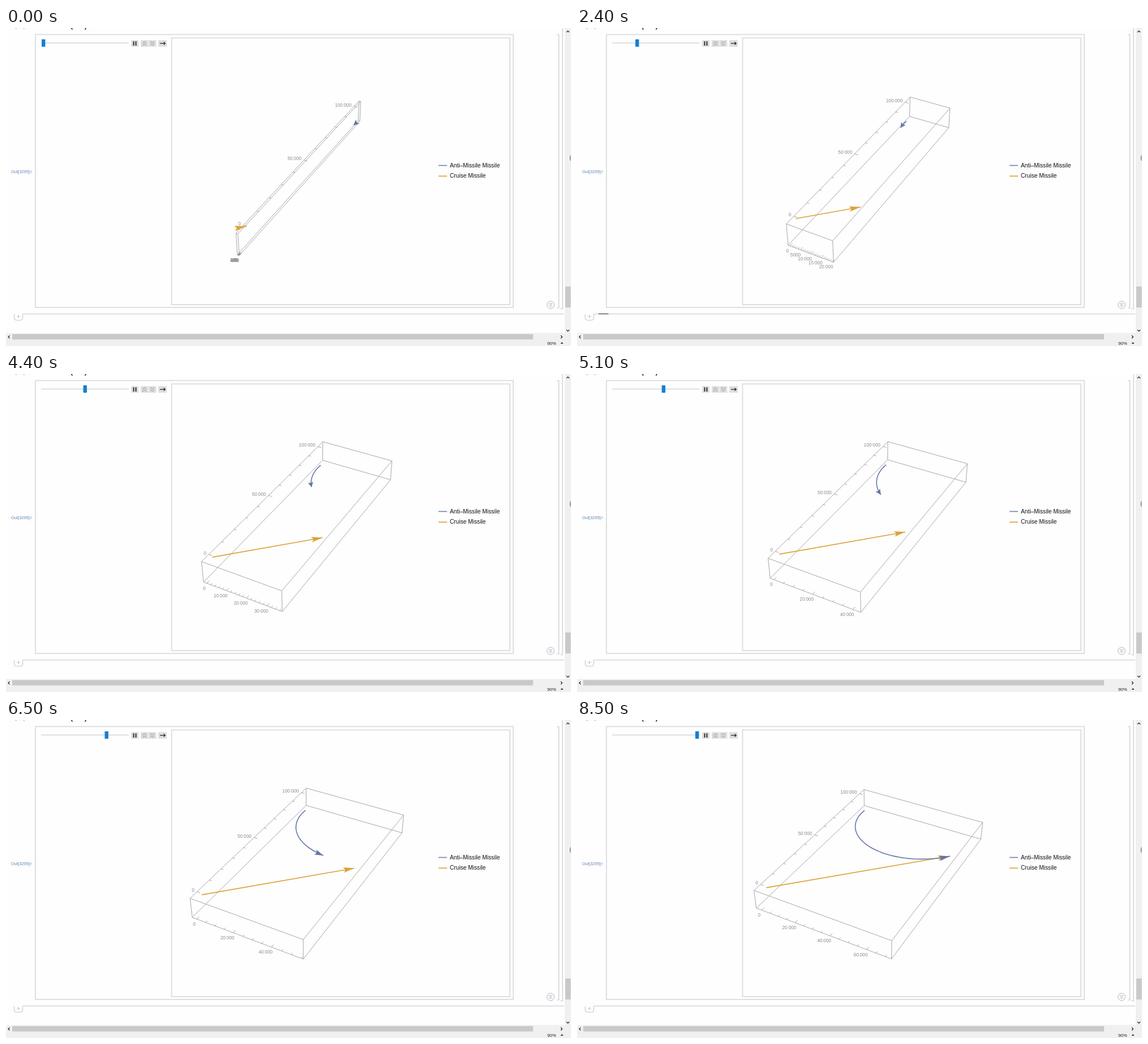
These frames come from a looping animation (998x561 px, 8600 ms). An HTML page with a canvas:

```html
<!DOCTYPE html>
<html lang="en">
<head>
<meta charset="utf-8">
<title>Missile intercept</title>
<style>
  html, body { margin: 0; width: 100%; height: 100%; overflow: hidden; background: #fefefe; }
  svg, canvas { position: absolute; left: 0; top: 0; width: 998px; height: 561px; }
  text { font-family: "Liberation Sans", Arial, sans-serif; }
  .frame { fill: none; stroke: #dcdcdc; stroke-width: 1.8; }
  .line { fill: none; stroke: #c8c8c8; stroke-width: 1.2; }
  .icon { fill: none; stroke: #8a8a8a; stroke-width: 1; }
  .dark { fill: none; stroke: #222; stroke-width: 1.2; }
  .button { fill: #dedede; }
  .bar { fill: #f0f0f0; }
  .thumb { fill: #c9c9c9; }
</style>
</head>
<body>
<svg viewBox="0 0 998 561">
  <text x="15" y="-1" font-size="12" fill="#999">( , ( ,</text>
  <text x="114" y="0" font-size="12" font-weight="bold" fill="#222">(sim)</text>

  <rect class="frame" x="52" y="11.5" width="844" height="481.5"/>
  <rect class="frame" x="292.5" y="17.5" width="597.5" height="470.5"/>

  <path class="line" d="M62 26.5H217"/>
  <rect id="slider" x="-3" y="20" width="6.4" height="13" fill="#167fd0"/>
  <rect class="button" x="221" y="21.5" width="13" height="11.5"/>
  <rect class="button" x="238" y="21.5" width="13.3" height="11.5"/>
  <rect class="button" x="252" y="21.5" width="13.3" height="11.5"/>
  <rect class="button" x="269" y="21.5" width="15" height="11.5"/>
  <path d="M225.5 23.5v7.5M229.5 23.5v7.5" stroke="#222" stroke-width="1.8"/>
  <path class="icon" d="M241 27l3.5-3 3.5 3M241 31l3.5-3 3.5 3M255 23.5l3.5 3 3.5-3M255 27.5l3.5 3 3.5-3"/>
  <path class="dark" d="M272 27.2h9M278.5 24.8l2.7 2.4-2.7 2.4"/>

  <text x="9" y="255.5" font-size="7.5" fill="#5f83b3">Out[3295]=</text>

  <path d="M764 242.5h15" stroke="#7189a9" stroke-width="1.7"/>
  <path d="M764 261.3h15" stroke="#dfa437" stroke-width="1.7"/>
  <text x="784" y="246" font-size="10.2" fill="#111">Anti–Missile Missile</text>
  <text x="784" y="264" font-size="10.2" fill="#111">Cruise Missile</text>

  <path class="line" d="M973 11.5h3.5V494h-3.5M983 0V495.5h-3.5"/>
  <circle cx="962" cy="488.5" r="6.5" fill="#f8f9fb" stroke="#b0b8c4"/>
  <path d="M959.5 485.5l2.5 2.2 2.5-2.2M959.5 489l2.5 2.2 2.5-2.2" fill="none" stroke="#98a3b5"/>

  <path class="line" d="M30 504.5H986"/>
  <path class="line" d="M14.5 505v6q0 4.5 4.5 4.5h6q4.5 0 4.5-4.5v-6.5M19 509h6M22 506v6"/>
  <path id="caret" d="M38 504.3h17.5" stroke="#777" stroke-width="1.8"/>

  <rect class="bar" x="987" width="11" height="561"/>
  <rect class="bar" y="538" width="998" height="23"/>
  <rect class="thumb" x="988" y="456" width="9.5" height="37"/>
  <rect class="thumb" x="11" y="540" width="920" height="9.5"/>
  <path class="dark" d="M990 7.5l2.5-2.5 2.5 2.5M990 532.5l2.5 2.5 2.5-2.5M6.5 542.5l-2.5 2.5 2.5 2.5M980 542.5l2.5 2.5-2.5 2.5"/>
  <text x="956" y="559" font-size="7.8" fill="#222">90%</text>
  <path d="M979.5 557l2.5-3 2.5 3z" fill="#333"/>
  <path d="M998 224.5l-1.5 2v6l1.5 1.5" fill="#fff" stroke="#444"/>
</svg>
<canvas id="plot"></canvas>

<script>
const LOOP = 8600, STEP = 100;
const LENGTH = 111000;          // data units along the longest box side, which has size 1
const HALF_HEIGHT = 0.051;
const FINAL_WIDTH = 0.688;
const BLUE = '#6474a9', ORANGE = '#dca23a', EDGE = '#a5a5a5';

// time and slider position; playback speed varies slightly
const PACE = [[0, 66], [1300, 87.5], [3400, 123], [4400, 139.5], [5700, 164], [7400, 192.5], [8500, 212]];

const canvas = document.getElementById('plot');
const slider = document.getElementById('slider');
const caret = document.getElementById('caret');
const ratio = window.devicePixelRatio || 1;
canvas.width = 998 * ratio;
canvas.height = 561 * ratio;
const ctx = canvas.getContext('2d');
ctx.scale(ratio, ratio);

let width, scale;

function sliderAt(t) {
  const i = Math.max(1, PACE.findIndex(([time]) => time >= t));
  const [t0, x0] = PACE[i - 1], [t1, x1] = PACE[i];
  return x0 + (x1 - x0) * (t - t0) / (t1 - t0);
}

// perspective view from (1.3, -2.4, 2) towards the box centre
function project([x, y, z]) {
  const depth = 3.384 - 0.384 * x + 0.709 * y - 0.591 * z;
  return [
    528 + scale * (0.879 * x + 0.476 * y) / depth,
    252 - scale * (-0.281 * x + 0.52 * y + 0.806 * z) / depth
  ];
}

const place = (x, y, h) => [x - 0.4566 * width, y - 0.4505, 0.093 * (h - 0.5)];

// circular turn; u is the flown share of the arc
function interceptor(u) {
  const turn = 2.27 * u, radius = 0.382;
  return place(radius * (1 - Math.cos(turn)), 0.901 - radius * Math.sin(turn), u);
}

function stroke(points, color, weight) {
  ctx.beginPath();
  points.forEach(p => ctx.lineTo(...p));
  ctx.strokeStyle = color;
  ctx.lineWidth = weight;
  ctx.stroke();
}

function drawBox() {
  const corner = n => [(n & 1 ? 0.5 : -0.5) * width, n & 2 ? 0.5 : -0.5, n & 4 ? HALF_HEIGHT : -HALF_HEIGHT];
  for (let n = 0; n < 8; n++)
    for (const bit of [1, 2, 4])
      if (!(n & bit)) stroke([project(corner(n)), project(corner(n | bit))], EDGE, 1);
}

function drawTick(base, inner, major) {
  const p = project(base), q = project(inner);
  const k = (major ? 6 : 4) / Math.hypot(q[0] - p[0], q[1] - p[1]);
  stroke([p, [p[0] + (q[0] - p[0]) * k, p[1] + (q[1] - p[1]) * k]], '#999', 0.9);
  return p;
}

function drawLabel(value, x, y, align) {
  const digits = String(value);
  const text = digits.length > 4 ? digits.slice(0, -3) + '\u2009' + digits.slice(-3) : digits;
  ctx.textAlign = align;
  ctx.fillText(text, align === 'center' ? x - 3 - 0.3 * ctx.measureText(text).width : x, y);
}

function niceStep(range) {
  for (let power = 10; ; power *= 10)
    for (const lead of [1, 2, 5])
      if (range / (lead * power) <= 4.5) return [lead * power, lead === 2 ? 4 : 5];
}

function drawAxes() {
  ctx.font = '8.3px "Liberation Sans", Arial, sans-serif';
  ctx.textBaseline = 'middle';
  ctx.fillStyle = '#8c8c8c';

  for (let v = 0; v <= 100000; v += 10000) {
    const y = v / LENGTH - 0.4505, major = v % 50000 === 0;
    const p = drawTick([-width / 2, y, HALF_HEIGHT], [0.05 - width / 2, y, HALF_HEIGHT], major);
    if (major) drawLabel(v, p[0] - 4.5, p[1] - 2, 'right');
  }

  const range = width * LENGTH, [step, parts] = niceStep(range);
  for (let i = 0; i * step / parts <= 0.9566 * range; i++) {
    const v = i * step / parts, x = v / LENGTH - 0.4566 * width, major = i % parts === 0;
    const p = drawTick([x, -0.5, -HALF_HEIGHT], [x, -0.45, -HALF_HEIGHT], major);
    if (major) drawLabel(v, p[0], p[1] + 9.3, 'center');
  }
}

// path in box space, with a head along the direction from one point to another
function drawArrow(path, from, to, color) {
  stroke(path.map(project), color, 1.6);
  const end = path[path.length - 1];
  const dir = to.map((v, i) => v - from[i]);
  const size = 19.5 * 3.3 / scale / Math.hypot(...dir);
  const tip = project(end);
  const back = project(end.map((v, i) => v - dir[i] * size));
  const dx = tip[0] - back[0], dy = tip[1] - back[1], k = 4.7 / Math.hypot(dx, dy);
  ctx.beginPath();
  ctx.moveTo(...tip);
  ctx.lineTo(back[0] - dy * k, back[1] + dx * k);
  ctx.lineTo(back[0] + dx * 0.18, back[1] + dy * 0.18);
  ctx.lineTo(back[0] + dy * k, back[1] - dx * k);
  ctx.fillStyle = color;
  ctx.fill();
}

function drawMissiles() {
  const start = place(0, 0, 0.965), reach = 0.901 * width;
  const end = place(reach, 0.98 * reach, 0.965);
  drawArrow([start, end], start, end, ORANGE);

  const flown = (width / FINAL_WIDTH) ** 2;   // constant acceleration
  const trail = Array.from({ length: 61 }, (_, i) => interceptor(flown * i / 60));
  drawArrow(trail, interceptor(flown - 0.01), interceptor(flown), BLUE);
}

function render(now) {
  const t = Math.floor(now % LOOP / STEP) * STEP;
  const knob = sliderAt(t);
  width = 0.008 + 0.00466 * (knob - 66);
  scale = 1520 / Math.hypot(width, 1, 2 * HALF_HEIGHT);

  slider.setAttribute('transform', `translate(${knob} 0)`);
  const blink = t % 1100;
  caret.style.visibility = blink > 150 && blink < 700 ? 'visible' : 'hidden';

  ctx.clearRect(0, 0, 998, 561);
  drawBox();
  drawAxes();
  drawMissiles();
}

const begin = performance.now();
function tick() {
  render(performance.now() - begin);
  requestAnimationFrame(tick);
}
tick();
</script>
</body>
</html>
```
